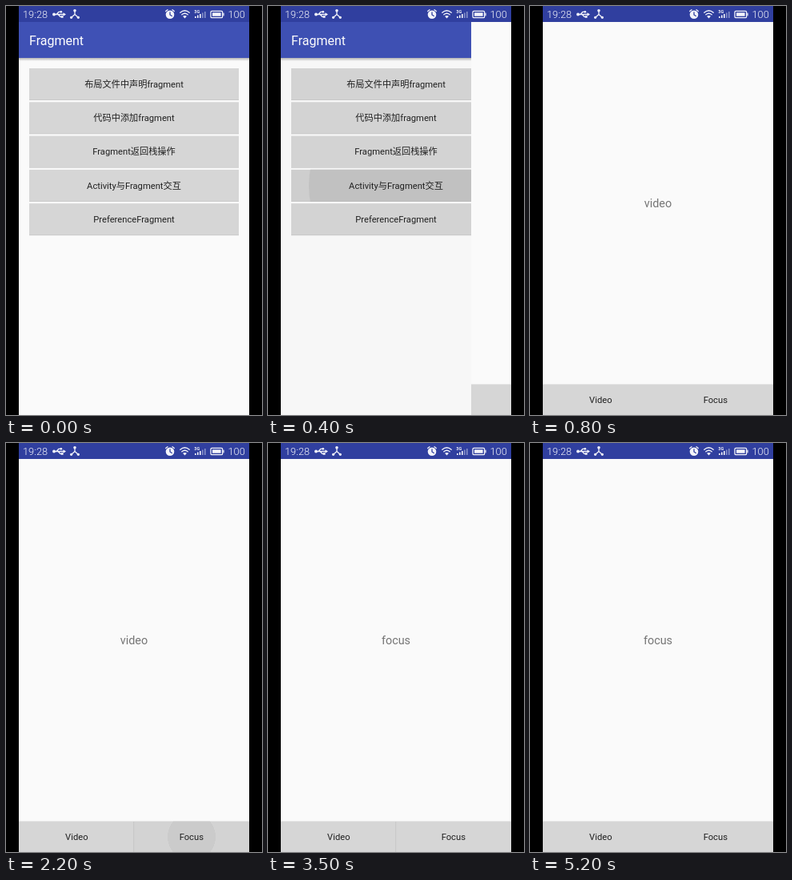
Write an HTML page that moves like this. It is 320 px wide and 512 px high and loops after 5.3 s.

```html
<!DOCTYPE html>
<html lang="zh-CN">
<head>
<meta charset="utf-8">
<title>Fragment</title>
<style>
  html, body { margin: 0; width: 100%; height: 100%; overflow: hidden; background: #000; }
  svg { display: block; width: 100%; height: 100%; }
  text { font-family: Roboto, "Noto Sans CJK SC", "Noto Sans CJK", sans-serif; }
  .label { font-size: 11.2px; fill: #212121; text-anchor: middle; }
  .title { font-size: 16px; fill: #fff; }
  .content { font-size: 14.4px; fill: #757575; text-anchor: middle; }
  .clock { font-size: 12.8px; font-weight: 300; fill: #f2f3fa; }
  .line { fill: none; stroke: #f2f3fa; stroke-width: 1.3; stroke-linecap: round; stroke-linejoin: round; }
  .solid { fill: #f2f3fa; }
  .button { fill: #d6d6d6; }
  .ripple { fill: #000; transform-box: view-box; transform-origin: 0 0; }
</style>
</head>
<body>
<svg viewBox="0 0 320 512">
  <defs>
    <clipPath id="screen"><rect x="16" width="288" height="512"/></clipPath>
    <linearGradient id="shade" x2="0" y2="1">
      <stop stop-color="#000" stop-opacity=".28"/>
      <stop offset="1" stop-color="#000" stop-opacity="0"/>
    </linearGradient>
  </defs>
  <g clip-path="url(#screen)">
    <g id="list">
      <rect x="16" width="288" height="512" fill="#fafafa"/>
      <rect x="16" y="20" width="288" height="45" fill="#3f51b5"/>
      <rect x="16" y="65" width="288" height="4" fill="url(#shade)"/>
      <text class="title" x="29" y="49">Fragment</text>
      <g id="items"></g>
      <rect id="dim" x="16" width="288" height="512" opacity="0"/>
    </g>
    <g id="page">
      <rect x="16" width="288" height="512" fill="#fafafa"/>
      <text class="content" id="video" x="160" y="252">video</text>
      <text class="content" id="focus" x="160" y="252">focus</text>
      <rect class="button" x="16" y="473.5" width="288" height="39"/>
      <g id="tabs"></g>
      <rect id="divider" x="159.2" y="474" width="1" height="38" fill="#c6c6c6"/>
    </g>
    <rect x="16" width="288" height="20" fill="#303f9f"/>
    <g id="status">
      <text class="clock" x="21" y="15">19:28</text>
      <text class="clock" x="277.5" y="15">100</text>
      <!-- usb -->
      <path class="line" d="M60 10.5H72M63 10.5L66 7.3H68M65 10.5L68 13.5H70"/>
      <circle class="solid" cx="60" cy="10.5" r="1.9"/>
      <path class="solid" d="M71.500 8.300L75 10.500L71.500 12.700Z"/>
      <circle class="solid" cx="68.800" cy="7.300" r="1.400"/>
      <rect class="solid" x="69" y="12.200" width="2.600" height="2.600"/>
      <!-- connection -->
      <path class="line" d="M86 6V10.5L81.500 14.500M86 10.500L90.500 14.500"/>
      <circle class="solid" cx="86" cy="5.800" r="1.800"/>
      <circle class="solid" cx="81.600" cy="14.300" r="1.600"/>
      <circle class="solid" cx="90.400" cy="14.300" r="1.600"/>
      <!-- alarm -->
      <circle class="solid" cx="205" cy="10.700" r="5.300"/>
      <path class="line" d="M199.700 6.500L202 4.700M210.300 6.500L208 4.700"/>
      <path class="line" style="stroke:#303f9f" d="M205 7.800V11L207.300 12.500"/>
      <!-- wifi -->
      <path class="line" d="M217.800 8.300Q223.500 3.200 229.200 8.300M219.800 10.800Q223.500 7.700 227.200 10.800"/>
      <path class="solid" d="M221 12.800Q223.500 11 226 12.800L223.500 15.500Z"/>
      <!-- signal and battery -->
      <text x="235.300" y="9.300" font-size="5.500" font-weight="700" fill="#f2f3fa">3G</text>
      <g id="bars"></g>
      <rect class="line" x="256" y="6.300" width="14.600" height="8.400" rx="1.300"/>
      <rect class="solid" x="258" y="8.300" width="10.600" height="4.400"/>
      <rect class="solid" x="271.300" y="8.700" width="1.300" height="3.600"/>
    </g>
  </g>
</svg>
<script>
const LOOP = 5300;
const $ = id => document.getElementById(id);

function add(parent, tag, attrs, text = "") {
  const el = document.createElementNS("http://www.w3.org/2000/svg", tag);
  for (const key in attrs) el.setAttribute(key, attrs[key]);
  el.textContent = text;
  parent.append(el);
  return el;
}

// Holds each [ms, value] until the next entry.
function track(el, property, steps) {
  const frames = steps.map(([ms, value]) =>
    ({ offset: ms / LOOP, [property]: value, easing: "step-end" }));
  frames.push({ offset: 1, [property]: steps.at(-1)[1] });
  el.animate(frames, { duration: LOOP, iterations: Infinity });
}

// Circular touch feedback inside a box; steps are [ms, radius, opacity].
function addRipple(parent, box, cx, cy, steps) {
  const id = "clip" + document.querySelectorAll("clipPath").length;
  add(add(parent, "clipPath", { id }), "rect", box);
  const group = add(parent, "g", { "clip-path": `url(#${id})` });
  const wash = add(group, "rect", { ...box, opacity: 0 });
  const spot = add(group, "circle", { class: "ripple", r: 1, opacity: 0 });
  const all = [[0, 1, 0], ...steps];
  track(spot, "transform", all.map(([ms, r]) => [ms, `translate(${cx}px, ${cy}px) scale(${r})`]));
  track(spot, "opacity", all.map(([ms, , alpha]) => [ms, alpha]));
  track(wash, "opacity", all.map(([ms, , alpha]) => [ms, alpha / 3]));
}

["布局文件中声明fragment", "代码中添加fragment", "Fragment返回栈操作",
 "Activity与Fragment交互", "PreferenceFragment"].forEach((name, i) => {
  const y = 78 + i * 42.3;
  const box = { x: 29, y, width: 262, height: 39.3 };
  add($("items"), "rect", { ...box, y: y + 0.7, fill: "#c4c4c4" });
  add($("items"), "rect", { ...box, class: "button" });
  if (i === 3) addRipple($("items"), box, 180, y + 20,
    [[100, 20, .05], [200, 55, .07], [300, 95, .07], [400, 129, .06], [600, 150, .03], [700, 150, 0]]);
  add($("items"), "text", { class: "label", x: 160, y: y + 23.6 }, name);
});

// Tap feedback timings for a tab button.
const tap = (start, spread) => [[.2, .04], [.5, .08], [.8, .08], [1, .05], [1, .02], [1, 0]]
  .filter((_, i) => spread === 6 || i % 3 !== 1)
  .map(([grow, alpha], i) => [start + i * 100, grow * 150, alpha]);

const leftTab = { x: 16, y: 473.5, width: 144, height: 39 };
const rightTab = { ...leftTab, x: 160 };
addRipple($("tabs"), rightTab, 232, 493, tap(2200, 6));
addRipple($("tabs"), leftTab, 88, 493, tap(3800, 4));
addRipple($("tabs"), rightTab, 232, 493, tap(4600, 6));
add($("tabs"), "text", { class: "label", x: 88.3, y: 496.7 }, "Video");
add($("tabs"), "text", { class: "label", x: 231.8, y: 496.7 }, "Focus");

for (let i = 0; i < 5; i++) {
  const height = 2 + i * 1.5;
  add($("bars"), "rect", { x: 236 + i * 3, y: 15 - height, width: 1.6, height,
    fill: "#f2f3fa", opacity: i < 3 ? 1 : .45 });
}

const slide = [[0, 288], [400, 238], [500, 47], [600, 10], [700, 1], [800, 0]];
track($("page"), "transform", slide.map(([ms, x]) => [ms, `translateX(${x}px)`]));
track($("dim"), "opacity", [[0, 0], [400, .012], [500, .065], [600, .08]]);
track($("video"), "opacity", [[0, 1], [2400, 0], [3900, 1], [4800, 0]]);
track($("focus"), "opacity", [[0, 0], [2400, 1], [3900, 0], [4800, 1]]);
track($("divider"), "opacity", [[0, 0], [2200, 1], [3800, 0]]);
</script>
</body>
</html>
```
